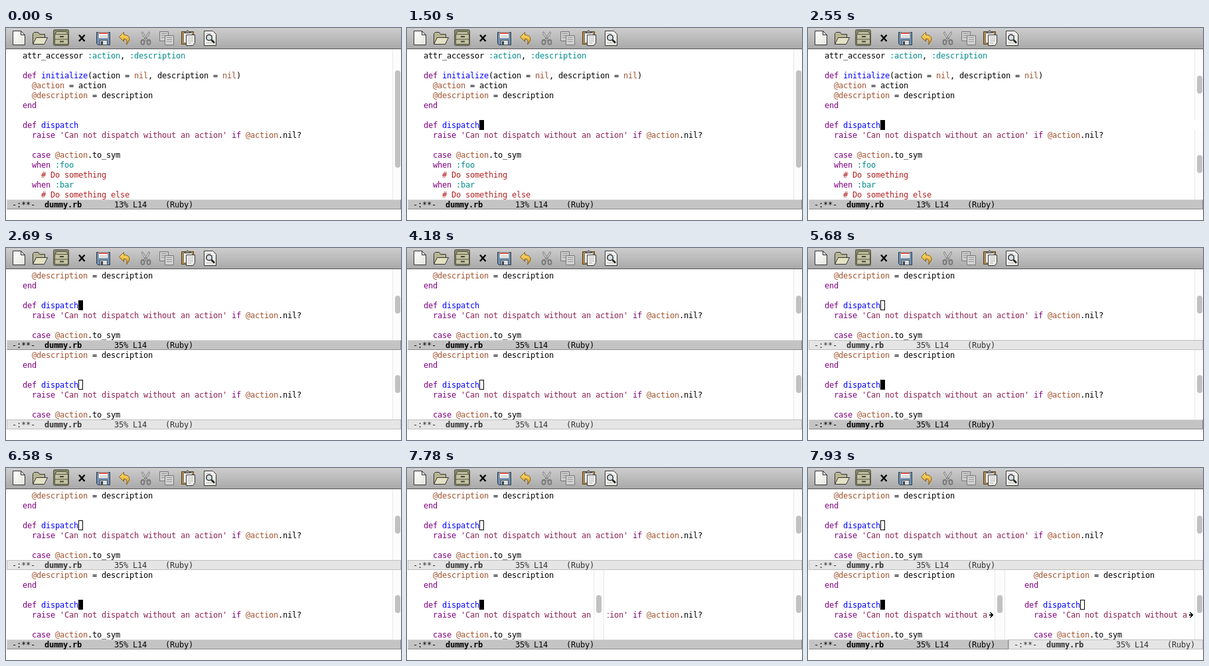
Write an HTML page that moves like this. It is 595 px wide and 290 px high and loops after 8000 ms.

```html
<!DOCTYPE html>
<html lang="en">
<head>
<meta charset="utf-8">
<title>Splitting editor windows</title>
<style>
  html, body { margin: 0; width: 100%; height: 100%; overflow: hidden; background: #fff; }
  #stage { position: relative; width: 595px; height: 290px; overflow: hidden; background: #fff;
    font: 12px/16px "DejaVu Sans Mono", monospace; letter-spacing: calc(7px - 1ch); color: #000; }
  #stage div { position: absolute; box-sizing: border-box; white-space: pre; }
  #toolbar { position: absolute; left: 0; top: 0; }
  .keyword { color: #7f007f; }
  .func { color: #00f; }
  .variable { color: #a0522d; }
  .constant { color: #008b8b; }
  .string { color: #8b2252; }
  .comment { color: #b22222; }
  .bar { background: #e5e5e5; color: #333; border: 1px solid #bfbfbf; }
  .bar.active { background: #c4c4c4; color: #000; border-color: #d8d8d8 #8c8c8c #8c8c8c #d8d8d8; }
  .bar span { position: absolute; left: 7px; top: -1px; }
  .track { background: #fcfcfc; border-left: 1px solid #e8e8e8; }
  .thumb { background: #c1c1c1; border-radius: 4px; }
  .solid { background: #000; }
  .hollow { border: 1px solid #000; }
  .strip { background: #fff; }
</style>
</head>
<body>
<div id="stage">
<svg id="toolbar" width="595" height="32" fill="none" stroke="#333" stroke-linejoin="round">
  <defs>
    <linearGradient id="chrome" x2="0" y2="1"><stop stop-color="#cdcdcd"/><stop offset="1" stop-color="#a9a9a9"/></linearGradient>
    <linearGradient id="paper" x2="1" y2="1"><stop stop-color="#fff"/><stop offset="1" stop-color="#e4e4de"/></linearGradient>
    <linearGradient id="gold" x2="0" y2="1"><stop stop-color="#ffe27a"/><stop offset="1" stop-color="#d99a18"/></linearGradient>
  </defs>
  <path fill="url(#chrome)" stroke="none" d="M0 0H595V31H0Z"/>
  <path stroke="#555" d="M0 31.5H595"/>

  <!-- new, open, browse -->
  <path fill="url(#paper)" d="M10.500 4.500H22.500L28.500 10.500V25.500H10.500Z"/>
  <path fill="#ddd" d="M22.500 4.500V10.500H28.500Z"/>
  <path fill="#b9b695" d="M40.500 23.500V8.500L42.500 6.500H48.500L50.500 9.500H58.500V14.500"/>
  <path fill="#e3e1c4" d="M40.500 24.500L45.500 14.500H62.500L57.500 24.500Z"/>
  <rect x="71.500" y="2.500" width="23" height="24" rx="2" fill="#85856d" stroke="#55554a"/>
  <path fill="#c2c2a2" stroke="#55553f" d="M73.500 9.500L76.500 5.500H90.500L93.500 9.500V24.500H73.500ZM73.500 9.500H93.500M73.500 17H93.500"/>
  <path stroke="#44443a" stroke-width="2" d="M81 13H87M81 20.500H87"/>

  <!-- close, save, undo -->
  <path stroke="#000" stroke-width="2.400" d="M110 10.500L118.500 20M118.500 10.500L110 20"/>
  <path fill="#708fae" stroke="#293947" d="M136.500 6.500H156.500V25.500H138.500L136.500 23.500Z"/>
  <path fill="#fff" stroke="#8d9ca9" d="M139.500 6.500H153.500V15.500H139.500Z"/>
  <path stroke="#d55745" stroke-width="2" d="M140 8H153"/>
  <path stroke="#bbb" d="M141 11.500H152M141 13.500H152"/>
  <path fill="#ddd" stroke="#455460" d="M141.500 18.500H152.500V25.500H141.500Z"/>
  <path fill="#37434d" stroke="none" d="M143 20H146V25H143Z"/>
  <path fill="url(#gold)" stroke="#855b0d" d="M170.500 13.500L177.500 6.500V10.500C184 10.500 187 14 185.500 19L181.500 25C183 19 182 16.500 177.500 16.500V20.500Z"/>

  <!-- cut, copy, paste, search -->
  <g stroke="#777">
    <path fill="#ddd" d="M205.500 5.500L214 19L212 20L204.500 8ZM215.500 5.500L207 19L209 20L216.500 8Z"/>
    <ellipse cx="206" cy="21.500" rx="2.500" ry="3.500" stroke-width="1.800"/>
    <ellipse cx="215" cy="21.500" rx="2.500" ry="3.500" stroke-width="1.800"/>
    <path fill="#ccc" d="M231.500 5.500H244.500V19.500H231.500Z"/>
    <path stroke="#999" d="M234 8.500H242M234 11.500H242M234 14.500H242"/>
    <path fill="#d2d2d2" d="M239.500 11.500H252.500V25.500H239.500Z"/>
    <path stroke="#999" d="M242 14.500H250M242 17.500H250M242 20.500H250"/>
  </g>
  <path fill="#b48b4b" stroke="#594016" d="M264.500 5.500H282.500V24.500H264.500Z"/>
  <path fill="#eee" stroke="#777" d="M267.500 7.500H280.500V22.500H267.500Z"/>
  <path fill="#aaa" d="M269.500 7.500V5.500H272L273.500 3.500L275 5.500H277.500V7.500Z"/>
  <path fill="url(#paper)" d="M271.500 10.500H284.500V22.500L281.500 26.500H271.500Z"/>
  <path stroke="#aaa" d="M274 13.500H282M274 16.500H282M274 19.500H282M274 22.500H279"/>
  <path fill="url(#paper)" d="M298.500 4.500H311.500L316.500 9.500V26.500H298.500Z"/>
  <path stroke="#bbb" d="M301 8.500H309M301 11.500H313M301 22.500H310"/>
  <circle cx="306" cy="14.500" r="4.300" fill="#d8e2e6" stroke-width="1.500"/>
  <path stroke="#222" stroke-width="2.800" d="M309.500 18L314 22.500"/>
</svg>
</div>
<script>
const LOOP = 8000, ROW = 15, COL = 7;
const SPLIT = 2690, SWAP = 4630, STRIP = 7780, THIRD = 7930;
const BLINKS = [600, 1050, 1500, 2100, 2550, 3140, 3580, 4180, 4630, 5080, 5680, 6130, 6580, 7180, 7630];

const SOURCE = `  attr_accessor :action, :description

  def initialize(action = nil, description = nil)
    @action = action
    @description = description
  end

  def dispatch
    raise 'Can not dispatch without an action' if @action.nil?

    case @action.to_sym
    when :foo
      # Do something
    when :bar
      # Do something else`.split('\n');
const EXCERPT = SOURCE.slice(4, 11);

const SYNTAX = /(?<comment>#.*)|(?<string>'[^']*'?)|(?<constant>:\w+)|(?<variable>@\w+|\bnil\b(?!\?))|(?<func>(?<=def )\w+)|\b(?<keyword>def|end|raise|if|case|when)\b/g;

const stage = document.getElementById('stage');
const parts = [];

function add(from, to, name, [x, y, w, h], html = '') {
  const el = document.createElement('div');
  el.className = name;
  el.style.cssText = `left:${x}px;top:${y}px;width:${w}px;height:${h}px`;
  el.innerHTML = html;
  stage.append(el);
  parts.push({ el, from, to, blinks: name === 'solid' });
}

function highlight(line) {
  return line.replace(SYNTAX, (text, ...rest) => {
    const groups = rest.at(-1);
    const kind = Object.keys(groups).find(key => groups[key]);
    return `<span class="${kind}">${text}</span>`;
  });
}

const ARROW = '<svg width="8" height="8" style="display:block" shape-rendering="crispEdges">' +
  '<path d="M3 0h2v1h1v1h1v1h1v2h-1v1h-1v1h-1v1h-2v-1h1v-1h1v-1h-3v-2h3v-1h-1v-1h-1z"/></svg>';

function code(from, to, x, y, lines, cols = 80) {
  lines.forEach((line, i) => {
    const top = y + i * ROW;
    add(from, to, 'line', [x + 10, top, cols * COL, ROW + 1], highlight(line.slice(0, cols)));
    if (line.length > cols) add(from, to, 'arrow', [x + 270, top + 4, 8, 8], ARROW);
  });
}

function bar(from, to, x, y, w, percent, active) {
  add(from, to, active ? 'bar active' : 'bar', [x, y, w, ROW],
    `<span>-:**-  <b>dummy.rb</b>       ${percent}% L14    (Ruby)</span>`);
}

function scroll(from, to, x, top, bottom, thumbTop, thumbHeight = 27) {
  add(from, to, 'track', [x, top, 15, bottom - top]);
  add(from, to, 'thumb', [x + 4, thumbTop, 8, thumbHeight]);
}

function cursor(from, to, x, y, kind) {
  add(from, to, kind, [x + 108, y, COL, ROW]);
}

// One window
code(0, SPLIT, 1, 34, SOURCE);
bar(0, SPLIT, 1, 259, 594, 13, true);
cursor(0, SPLIT, 1, 139, 'solid');
scroll(0, 2550, 582, 32, 259, 64, 147);

// Two windows, stacked
scroll(2550, LOOP, 582, 32, 139, 72);
scroll(2550, LOOP, 582, 154, 259, 192);
code(SPLIT, LOOP, 1, 34, EXCERPT);
code(SPLIT, THIRD, 1, 154, EXCERPT);
bar(SPLIT, SWAP, 1, 139, 594, 35, true);
bar(SPLIT, SWAP, 1, 259, 594, 35, false);
cursor(SPLIT, SWAP, 1, 79, 'solid');
cursor(SPLIT, SWAP, 1, 199, 'hollow');

bar(SWAP, LOOP, 1, 139, 594, 35, false);
bar(SWAP, THIRD, 1, 259, 594, 35, true);
cursor(SWAP, LOOP, 1, 79, 'hollow');
cursor(SWAP, LOOP, 1, 199, 'solid');

// Lower window split side by side
add(STRIP, LOOP, 'strip', [281, 154, 21, 105]);
scroll(STRIP, LOOP, 281, 154, 259, 192);
add(STRIP, LOOP, 'track', [296, 154, 1, 105]);
for (const x of [1, 302]) code(THIRD, LOOP, x, 154, EXCERPT, 37);
bar(THIRD, LOOP, 1, 259, 301, 35, true);
bar(THIRD, LOOP, 302, 259, 293, 35, false);
cursor(THIRD, LOOP, 302, 199, 'hollow');

const start = performance.now();
function render() {
  const t = Math.max(0, performance.now() - start) % LOOP;
  const lit = BLINKS.filter(time => time <= t).length % 2 === 1;
  for (const { el, from, to, blinks } of parts) {
    const shown = t >= from && t < to && (!blinks || lit);
    el.style.visibility = shown ? 'visible' : 'hidden';
  }
  requestAnimationFrame(render);
}
render();
</script>
</body>
</html>
```
